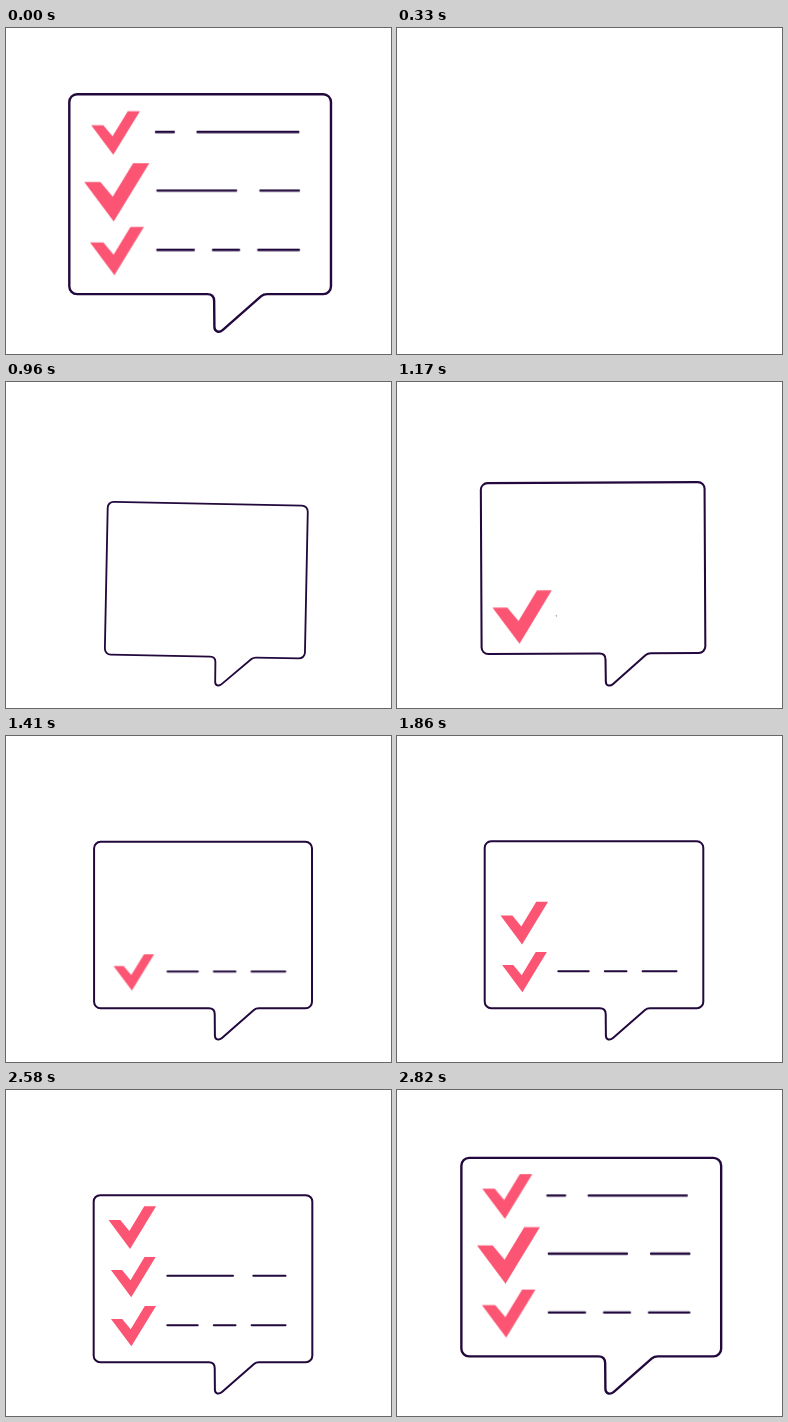
These frames come from a looping animation (385 px wide and 326 px high, 2850 ms). An HTML page without scripts:

```html
<!DOCTYPE html>
<html lang="en">
<head>
<meta charset="utf-8">
<title>Checklist bubble</title>
<style>
  html, body { margin: 0; width: 100%; height: 100%; overflow: hidden; background: #fff; }
  svg { display: block; width: 385px; height: 326px; }

  :root {
    --loop: 2850ms;
    --quad-out: cubic-bezier(.25, .46, .45, .94);
    --sine-out: cubic-bezier(.39, .575, .565, 1);
    --sine: cubic-bezier(.37, 0, .63, 1);
  }

  .ink { fill: none; stroke: #22083d; stroke-width: 2; stroke-linecap: round; stroke-linejoin: round; }
  .tick { fill: #fb5573; }

  .leave, .bubble { transform-origin: 211.5px 303px; }
  .leave { animation: leave var(--loop) -270ms infinite; }
  .bubble {
    animation: pop var(--loop) -2310ms infinite, swing var(--loop) -2310ms infinite;
  }

  .pop, .swell, .wipe { transform-origin: 0 0; }
  .pop { animation: pop var(--loop) var(--start) infinite; }
  .wipe { animation: wipe var(--loop) var(--start) infinite; }
  .swell { animation: swell var(--loop) var(--swell) infinite; }

  /* start = entry time minus one loop */
  .low { --start: -1785ms; --swell: 0ms; }
  .mid { --start: -1065ms; --swell: -115ms; }
  .top { --start: -345ms; }
  .low.row { animation: show-low var(--loop) step-end infinite; }
  .mid.row { animation: show-mid var(--loop) step-end infinite; }
  .top.row { animation: show-top var(--loop) step-end infinite; }

  /* springy entrance */
  @keyframes pop {
    0% { scale: 0; animation-timing-function: var(--sine-out); }
    6.14% { scale: 1.45; animation-timing-function: var(--sine); }
    13.68% { scale: .89; animation-timing-function: var(--sine); }
    21.05% { scale: 1.03; animation-timing-function: var(--sine); }
    28.42% { scale: .994; animation-timing-function: var(--sine); }
    35.79%, 100% { scale: 1; }
  }
  @keyframes swing {
    0% { rotate: 10deg; animation-timing-function: var(--sine); }
    8.95% { rotate: -4.5deg; animation-timing-function: var(--sine); }
    14.74% { rotate: 1.15deg; animation-timing-function: var(--sine); }
    21.05% { rotate: -.35deg; animation-timing-function: var(--sine); }
    28.07%, 100% { rotate: 0deg; }
  }

  /* grow a little, then shrink into the tail */
  @keyframes leave {
    0% { scale: 1; animation-timing-function: var(--quad-out); }
    13.68% { scale: 1.21; animation-timing-function: cubic-bezier(.5, 0, .8, .5); }
    21.05% { scale: 0; animation-timing-function: step-end; }
    28.42%, 100% { scale: 1; }
  }
  @keyframes swell {
    0% { scale: 1; animation-timing-function: var(--sine); }
    6.5% { scale: 1.23; animation-timing-function: var(--sine); }
    12%, 100% { scale: 1; }
  }
  @keyframes wipe {
    0%, 3.33% { scale: 0 1; animation-timing-function: var(--sine); }
    13.33%, 100% { scale: 1 1; }
  }

  @keyframes show-low { 0% { opacity: 1; } 11.58% { opacity: 0; } 37.37%, 100% { opacity: 1; } }
  @keyframes show-mid { 0% { opacity: 1; } 11.58% { opacity: 0; } 62.63%, 100% { opacity: 1; } }
  @keyframes show-top { 0% { opacity: 1; } 11.58% { opacity: 0; } 87.89%, 100% { opacity: 1; } }
</style>
</head>
<body>
<svg viewBox="0 0 385 326" xmlns="http://www.w3.org/2000/svg">
  <defs>
    <path id="tick" d="M-22.5-7H-11.3L-2.8 3.2 11.3-20H22.5L-2.1 20.3Z"/>
    <clipPath id="wipe-low"><rect class="wipe low" y="-4" width="124" height="8"/></clipPath>
    <clipPath id="wipe-mid"><rect class="wipe mid" y="-4" width="124" height="8"/></clipPath>
    <clipPath id="wipe-top"><rect class="wipe top" y="-4" width="124" height="8"/></clipPath>
  </defs>

  <g class="leave">
    <g class="bubble">
      <path class="ink" d="M94.2 105.2H299.8a6.5 6.5 0 0 1 6.5 6.5V265.7a6.5 6.5 0 0 1-6.5 6.5H253q-3 0-5 1.7L216 302C213 304.6 208.9 304 208.9 299.5L208.7 278q0-5.8-5.8-5.8H94.2a6.5 6.5 0 0 1-6.5-6.5V111.7a6.5 6.5 0 0 1 6.5-6.5Z"/>

      <g class="row low">
        <g transform="translate(127.5 236)">
          <g class="swell"><g class="pop"><use href="#tick" class="tick"/></g></g>
        </g>
        <g transform="translate(158 235.2)">
          <g clip-path="url(#wipe-low)"><path class="ink" d="M3.3 0H33.7M49.8 0H71.5M87.6 0H121.5"/></g>
        </g>
      </g>

      <g class="row mid">
        <g transform="translate(127.3 187)">
          <g class="swell"><g class="pop"><use href="#tick" class="tick"/></g></g>
        </g>
        <g transform="translate(158 185.7)">
          <g clip-path="url(#wipe-mid)"><path class="ink" d="M3.3 0H69M89.3 0H121.5"/></g>
        </g>
      </g>

      <g class="row top">
        <g transform="translate(126.3 137.5)">
          <g class="pop"><use href="#tick" class="tick"/></g>
        </g>
        <g transform="translate(158 136.8)">
          <g clip-path="url(#wipe-top)"><path class="ink" d="M2.1 0H17M36.8 0H121"/></g>
        </g>
      </g>
    </g>
  </g>
</svg>
</body>
</html>
```
